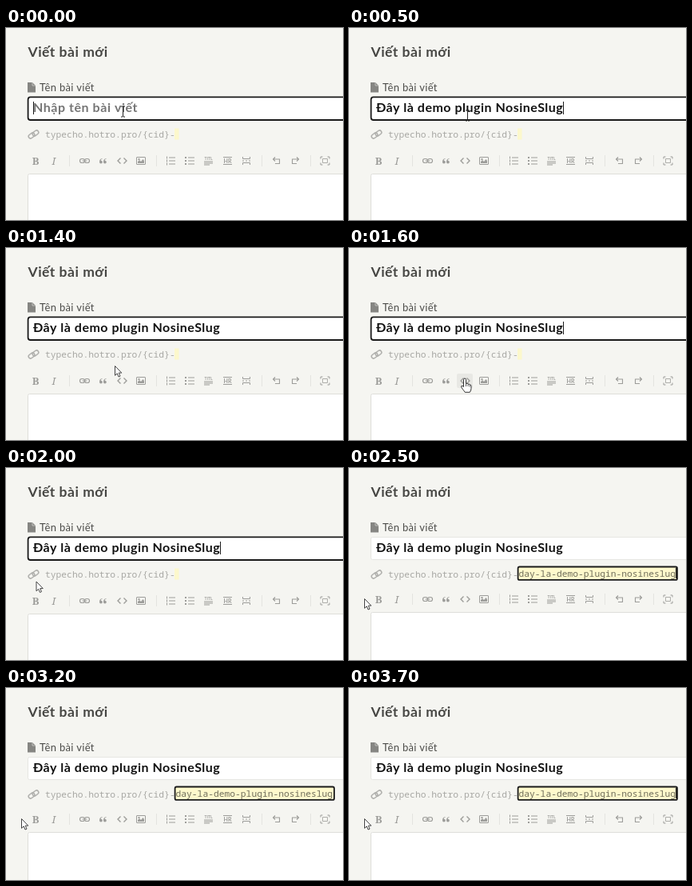
These frames come from a looping animation (422x240 px, 4.1 s). An HTML page with a canvas:

```html
<!DOCTYPE html>
<html lang="vi">
<head>
<meta charset="utf-8">
<title>Viết bài mới</title>
<style>
html, body { margin: 0; width: 100%; height: 100%; overflow: hidden; background: #f5f5f1; }
canvas { display: block; }
</style>
</head>
<body>
<canvas id="stage" width="422" height="240"></canvas>
<script>
const ctx = document.getElementById('stage').getContext('2d');
const LOOP = 4100, STEP = 100, TYPED = 500, BLUR = 2500;
const TITLE = 'Đây là demo plugin NosineSlug';
const SLUG = 'day-la-demo-plugin-nosineslug';
const SANS = 'Lato, "Open Sans", sans-serif';
const MONO = '11.3px "Noto Sans Mono", "DejaVu Sans Mono", monospace';
const BG = '#f5f5f1', ICON = '#9d9d9a', INK = '#1a1a1a';

// time, x, y of the pointer's hot spot
const path = [
  [0, 146, 104], [500, 148, 108.5], [600, 150, 110], [700, 172, 119],
  [800, 208, 126], [900, 236, 132], [1000, 246, 134], [1100, 190, 135],
  [1200, 132, 134], [1300, 132, 134], [1400, 136, 147], [1500, 143, 161],
  [1600, 145, 163.5], [1700, 122, 158], [1800, 84, 149], [1900, 52, 144],
  [2000, 37.5, 141.5], [2100, 28, 150], [2200, 21, 160], [2300, 19, 163]
];

function pointer(t) {
  const i = path.findIndex(p => p[0] > t);
  if (i < 0) return path[path.length - 1].slice(1);
  const [t0, x0, y0] = path[i - 1], [t1, x1, y1] = path[i];
  const k = (t - t0) / (t1 - t0);
  return [x0 + (x1 - x0) * k, y0 + (y1 - y0) * k];
}

function text(str, x, y, font, color, gap = 0) {
  ctx.font = font;
  ctx.letterSpacing = gap + 'px';
  ctx.fillStyle = color;
  ctx.fillText(str, x, y);
  return x + ctx.measureText(str).width;
}

function rect(x, y, w, h, color) {
  ctx.fillStyle = color;
  ctx.fillRect(x, y, w, h);
}

function box(x, y, w, h, r, fill, stroke, lw) {
  ctx.beginPath();
  ctx.roundRect(x, y, w, h, r);
  if (fill) { ctx.fillStyle = fill; ctx.fill(); }
  if (stroke) { ctx.strokeStyle = stroke; ctx.lineWidth = lw; ctx.stroke(); }
}

function shape(d, x, y, stroke, lw = 1, fill) {
  const p = new Path2D(d);
  ctx.save();
  ctx.translate(x, y);
  if (fill) { ctx.fillStyle = fill; ctx.fill(p); }
  if (stroke) { ctx.strokeStyle = stroke; ctx.lineWidth = lw; ctx.stroke(p); }
  ctx.restore();
}

function pageIcon() {
  shape('M0 0H6L10 4V12.5H0Z', 27, 68, null, 0, '#868683');
  shape('M6 0V4H10', 27, 68, '#d0d0cc', 0.8);
}

function chain() {
  ctx.save();
  ctx.translate(34.5, 133);
  ctx.rotate(-0.65);
  box(-7, -2.8, 8.2, 5, 2.5, null, '#b0b0ad', 1.5);
  box(-1.2, -2.2, 8.2, 5, 2.5, null, '#b0b0ad', 1.5);
  ctx.restore();
}

function list(x, y, numbered) {
  for (const d of [-4, 0, 4]) {
    rect(x - 2, y + d - 0.5, 8, 1, ICON);
    if (numbered) rect(x - 5, y + d - 1.5, 1, 3, ICON);
    else rect(x - 6, y + d - 1, 2, 2, ICON);
  }
}

function toolbar(y, hover) {
  if (hover) box(135, y - 9, 20, 18, 2, '#e8e8e4');
  ctx.textAlign = 'center';
  const serif = '"Noto Serif", "Liberation Serif", serif';
  text('B', 37, y + 5, 'bold 13px ' + serif, ICON);
  text('I', 60, y + 5, 'italic 13px ' + serif, ICON);
  text('HR', 277.5, y + 2.5, 'bold 7px ' + SANS, ICON);
  text('TITL', 253.5, y - 1, 'bold 5px ' + SANS, ICON);
  ctx.textAlign = 'left';

  for (const x of [79, 188, 320, 381]) rect(x, y - 7, 1, 14, '#e4e4e0');

  box(92.5, y - 2.5, 6, 5, 2.5, null, ICON, 1.2);
  box(98.5, y - 2.5, 6, 5, 2.5, null, ICON, 1.2);
  rect(95.5, y - 0.5, 6, 1, ICON);

  for (const x of [117, 122])
    shape('M3.5 -3.5C1 -3 0 -1.5 0 1A1.9 1.9 0 1 0 1.7 -0.8C1.8 -2 2.5 -2.6 3.8 -2.9Z', x, y + 0.5, null, 0, ICON);

  shape('M-2 -3.5L-5.5 0L-2 3.5M2 -3.5L5.5 0L2 3.5', 145.5, y, ICON, 1.4);

  box(163.5, y - 4.5, 11, 9, 0.5, null, ICON, 1);
  shape('M-4 3V1L-2 -1L0 1L2.5 -2L4 0V3Z', 169, y, null, 0, ICON);
  rect(165.5, y - 3, 2, 2, ICON);

  list(206, y, true);
  list(230, y, false);

  for (const d of [1, 3, 5]) rect(248, y + d - 0.5, d === 5 ? 7 : 11, 1, ICON);

  rect(272, y - 5, 11, 1, ICON);
  rect(272, y + 4, 11, 1, ICON);

  shape('M-4.5 -5V-2.5H4.5V-5M-4.5 5V2.5H4.5V5', 301, y, ICON, 1);
  for (const d of [-5, -1, 3]) rect(301 + d, y - 0.5, 2, 1, ICON);

  const turn = 'M-4.5 -2H3.5V3.5H-2M-2 -4.5L-4.5 -2L-2 0.5';
  shape(turn, 339, y, ICON, 1.1);
  ctx.save();
  ctx.translate(362, 0);
  ctx.scale(-1, 1);
  shape(turn, 0, y, ICON, 1.1);
  ctx.restore();

  box(396.5, y - 2.5, 6, 5, 0, null, ICON, 0.8);
  shape('M-5.5 -2.5V-5H-3M3 -5H5.5V-2.5M5.5 2.5V5H3M-3 5H-5.5V2.5', 399.5, y, ICON, 1);
}

function cursor(t) {
  const [x, y] = pointer(t);
  if (t < 700) {
    shape('M-2.5 -6.5H-0.5L0 -6L0.5 -6.5H2.5M0 -6V6M-2.5 6.5H-0.5L0 6L0.5 6.5H2.5',
      Math.round(x) + 0.5, Math.round(y) + 0.5, '#222', 1);
  } else if (t >= 1500 && t <= 1600) {
    shape('M-1.5 10V1Q-1.5 -0.5 0 -0.5Q1.5 -0.5 1.5 1V6Q3.7 5 4 6.7Q6 6 6.2 7.6Q8 7 8 9V12Q8 14.5 6.3 16.8H0.2Q-1 14.8 -2.8 12.8Q-5 10 -4.2 9Q-3 8 -1.5 10Z',
      x, y, '#333', 1, '#fff');
    shape('M1.5 6V9.5M4 7V9.5M6.2 8V10', x, y, '#333', 0.8);
  } else {
    shape('M0.5 0.5V12.3L3.2 9.8L5 14L7 13.1L5.2 9.1H8.8Z', x, y, '#444', 1, '#fff');
  }
}

function draw(t) {
  const done = t >= BLUR, font = 'bold 16px ' + SANS;
  rect(0, 0, 422, 240, BG);

  text('Viết bài mới', 27.5, 36, 'bold 17.5px ' + SANS, '#464643', 0.5);
  pageIcon();
  text('Tên bài viết', 42, 79, '13px ' + SANS, '#4c4c49', 0.3);

  if (done) box(27.5, 86.5, 420, 28, 2, '#fff', '#e6e6e2', 1);
  else box(27.6, 86.4, 420, 28.6, 3, '#fff', INK, 1.8);

  let end = 34;
  if (t < STEP) {
    text('Nhập tên bài viết', 34, 105, font, '#757575', 0.55);
  } else {
    const n = Math.min(TITLE.length, Math.round(TITLE.length * t / TYPED));
    end = text(TITLE.slice(0, n), 34, 105, font, '#111', 0.5);
  }
  const lit = t < TYPED || t % 500 < 200;
  if (!done && lit) rect(Math.round(end), 92, 1, 16, INK);

  chain();
  text('typecho.hotro.pro/{cid}-', 49, 137, MONO, '#a8a8a4');
  if (done) {
    box(211.6, 123.5, 199.4, 16.4, 2, '#fff9cc', INK, 1.8);
    text(SLUG, 212.5, 135.5, MONO, '#6f6d5a');
    if (t < 3200 || t >= 3700) rect(409, 125, 1, 13, INK);
  } else {
    rect(211, 125.5, 5.5, 14, '#fcf8cc');
  }

  const lift = done ? 2 : 0;
  toolbar(166 - lift, t >= 1500 && t <= 1600);
  box(27.5, 182.5 - lift, 420, 80, 2, '#fff', '#dededa', 1);
  cursor(t);
}

const start = performance.now();
function tick() {
  const t = (performance.now() - start) % LOOP;
  draw(Math.floor(t / STEP) * STEP);
  requestAnimationFrame(tick);
}
tick();
</script>
</body>
</html>
```
